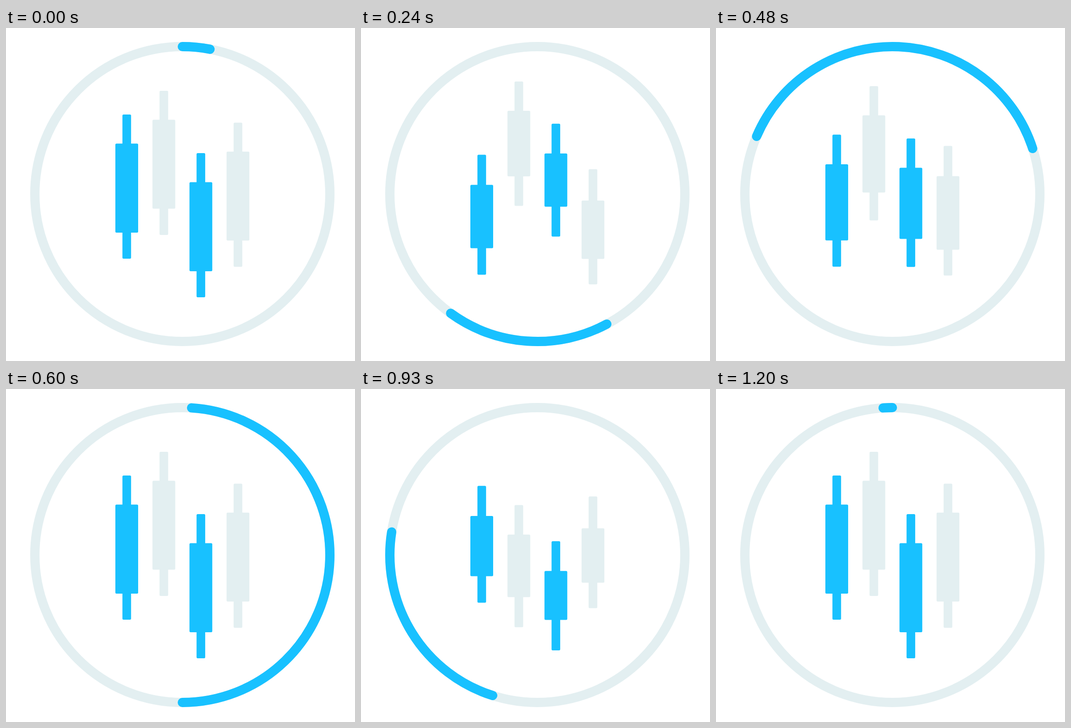
Animation, 750 px wide and 716 px high, one loop 1230 ms. Source, as an HTML page:

```html
<!DOCTYPE html>
<html lang="en">
<head>
<meta charset="utf-8">
<title>Candlestick loader</title>
<style>
  html, body { margin: 0; width: 100%; height: 100%; overflow: hidden; background: #fff; }
  svg { display: block; width: 100%; height: 100%; }
  .ring { fill: none; stroke-width: 20; stroke-linecap: round; }
</style>
</head>
<body>
<svg id="stage" viewBox="0 0 750 716">
  <circle class="ring" cx="379" cy="357" r="317" stroke="#e3eff1"/>
  <path class="ring" id="arc" stroke="#18c1ff"/>
</svg>
<script>
const BLUE = '#18c1ff', PALE = '#e3eff1';
const STEP = 30, STEPS = 41;
const CX = 379, CY = 357, R = 317;
const stage = document.getElementById('stage');
const arc = document.getElementById('arc');

// Each pose: wick top, body top, body bottom, wick bottom.
// Candles go rest -> first -> rest -> second -> rest, ten steps per leg.
const candles = [
  { x: 235,   color: BLUE, rest: [186, 248.5, 440, 496],
    first: [294, 359.5, 482, 539], second: [210.6, 275.8, 398.2, 455.5] },
  { x: 314.7, color: PALE, rest: [135, 197.3, 388.4, 445],
    first: [109.9, 173.2, 301.8, 367], second: [262.2, 325.9, 454, 519.8] },
  { x: 394.3, color: BLUE, rest: [269, 331.5, 522.9, 579],
    first: [190, 254.2, 349.5, 416], second: [333.8, 398, 493.6, 560] },
  { x: 474,   color: PALE, rest: [203.5, 265.8, 457, 513.5],
    first: [328.5, 397.3, 506.4, 560.6], second: [234.1, 303.2, 412, 466.6] }
];

function addRect(x, width, fill) {
  const el = document.createElementNS('http://www.w3.org/2000/svg', 'rect');
  const attrs = { x, width, fill, rx: 2.5 };
  for (const name in attrs) el.setAttribute(name, attrs[name]);
  return stage.appendChild(el);
}

function span(el, top, bottom) {
  el.setAttribute('y', top);
  el.setAttribute('height', bottom - top);
}

for (const c of candles) {
  c.wick = addRect(c.x + 15.2, 18.6, c.color);
  c.body = addRect(c.x, 49, c.color);
}

function onRing(deg) {
  const a = deg * Math.PI / 180;
  return `${CX + R * Math.sin(a)} ${CY - R * Math.cos(a)}`;
}

function drawArc(k) {
  const head = k < 20 ? 27 * k : 360 + 9 * k;
  const tail = 10.8 + 17.64 * k;
  const from = Math.min(head, tail), to = Math.max(head, tail);
  arc.setAttribute('d', `M${onRing(from)}A${R} ${R} 0 ${to - from > 180 ? 1 : 0} 1 ${onRing(to)}`);
}

function drawCandles(k) {
  const amount = 1 - Math.abs(k % 20 - 10) / 10;
  for (const c of candles) {
    const pose = k < 20 ? c.first : c.second;
    const [wt, bt, bb, wb] = c.rest.map((v, i) => v + (pose[i] - v) * amount);
    span(c.wick, wt, wb);
    span(c.body, bt, bb);
  }
}

function draw() {
  // Small offset keeps timer rounding from falling into the previous step.
  const k = Math.floor((performance.now() + 2) / STEP) % STEPS;
  drawArc(k);
  drawCandles(k);
  requestAnimationFrame(draw);
}
draw();
</script>
</body>
</html>
```
